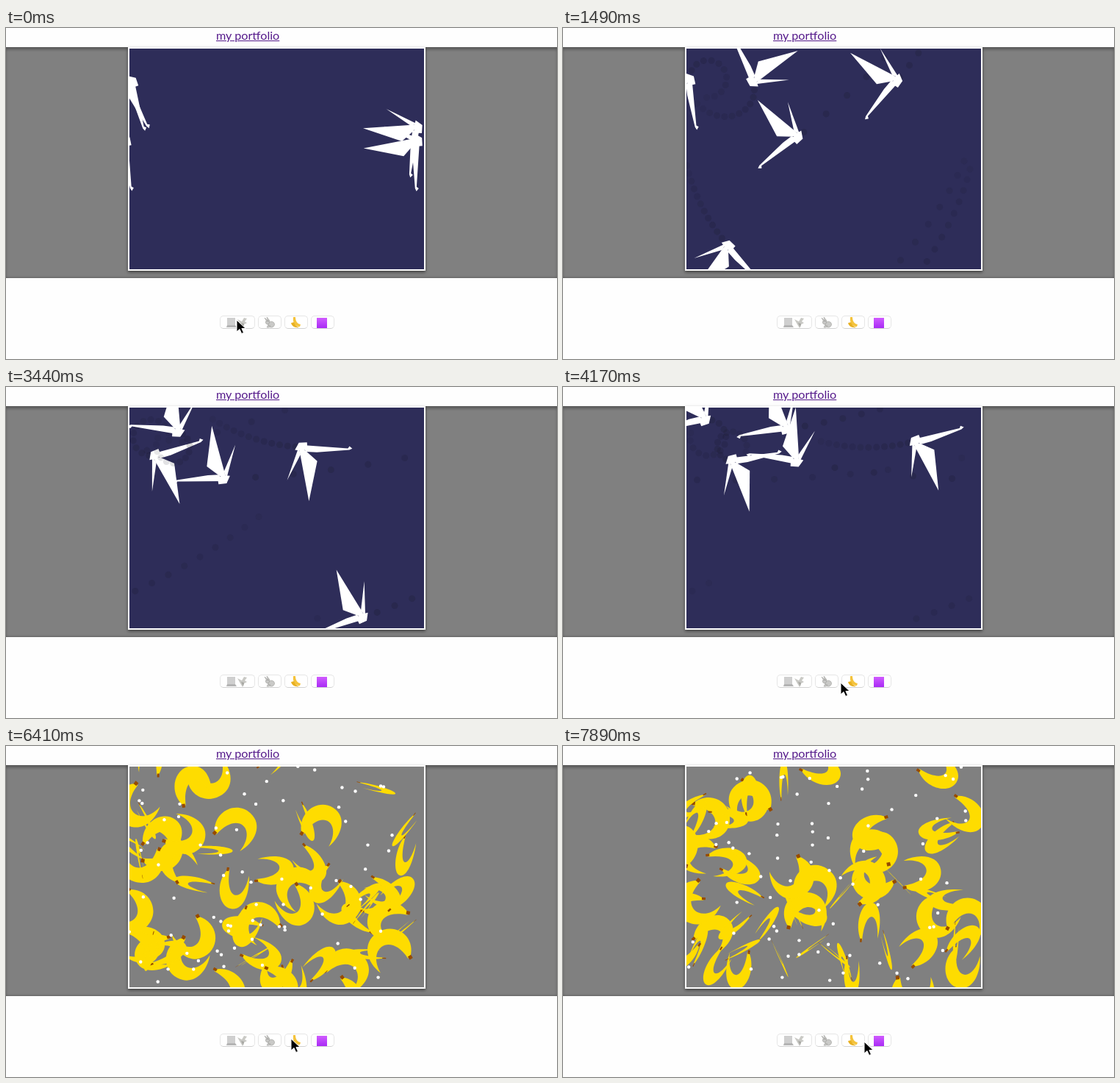
Recreate the animation shown at these times as an HTML page with a canvas. Size 750x450 px, loop 8000 ms.

```html
<!DOCTYPE html>
<html lang="en">
<head>
<meta charset="utf-8">
<title>my portfolio</title>
<style>
  html, body { margin: 0; width: 100%; height: 100%; overflow: hidden; background: #fefefe; }
  body > * { position: absolute; }
  a { left: 286px; top: 0; font: 16.2px/19px Lato, sans-serif; color: #551a8b; text-decoration: underline; }
  .band { left: 0; top: 26px; width: 750px; height: 314px; background: #808080;
          box-shadow: inset 0 4px 4px -1px rgba(0,0,0,.35), inset 0 -2px 3px -1px rgba(0,0,0,.25); }
  canvas { left: 166px; top: 26px; border: 2px solid #fff; box-shadow: 0 2px 4px rgba(0,0,0,.5); }
  .button { top: 391px; width: 30px; height: 16px; border: 1px solid #e6e6e6; border-bottom-color: #d2d2d2;
            border-radius: 5px; background: #fff; }
  svg { left: 0; top: 0; }
</style>
</head>
<body>
<a>my portfolio</a>
<div class="band"></div>
<canvas id="stage" width="401" height="300"></canvas>
<div class="button" style="left:291px;width:46px"></div>
<div class="button" style="left:343px"></div>
<div class="button" style="left:379px"></div>
<div class="button" style="left:415px"></div>
<svg width="750" height="450">
  <defs><linearGradient id="purple" x2="0" y2="1"><stop stop-color="#d05cff"/><stop offset="1" stop-color="#a92bf5"/></linearGradient></defs>
  <path d="M301 394h11v10h-11z" fill="#cfcfcf"/>
  <path d="M301 404h11l2 3h-14z" fill="#b4b4b4"/>
  <path d="M315 396l6 3 3-5 4 1-3 4 3 2-4 2-2 5-3-5z" fill="#c9c9c5"/>
  <path d="M320 401l3 6 1-5z" fill="#a5a5a0"/>
  <g fill="#c9c9c7" stroke="#9a9a98" stroke-width=".6">
    <ellipse cx="361" cy="403" rx="4.5" ry="4"/>
    <circle cx="356" cy="400" r="2.6"/>
    <path d="M352 394l5 4-2 1zM355 393l4 5-2 1zM357 404l-2 3h3l2-2z"/>
  </g>
  <path d="M391 393c-1 7 2 13 9 13l1-3c-5-1-7-5-7-10z" fill="#f4c33c"/>
  <path d="M388 401c1 4 5 7 11 6-4-1-6-4-7-7z" fill="#e8b020"/>
  <rect x="423" y="394" width="14" height="14" fill="url(#purple)"/>
  <path id="cursor" d="M0 0v16l4-3.5 2.7 6 2.8-1.2-2.6-5.8h5.3z" stroke="#fff"/>
</svg>
<script>
const LOOP = 8000, STEP = 148.7, SWITCH = 40;
const LEFT = 168, TOP = 28, WIDTH = 400, HEIGHT = 300;
const SAMPLES = 10, DROP = 7;  // path samples per step, samples between trail dots
const ctx = document.getElementById('stage').getContext('2d');
const cursor = document.getElementById('cursor');

const mod = (v, size) => ((v % size) + size) % size;
const mix = (a, b, u) => a + (b - a) * u;
const ramp = (v, from, to) => Math.min(1, Math.max(0, (v - from) / (to - from)));
const rand = (i, k) => mod(Math.sin(i * 127.1 + k * 311.7) * 43758.5453, 1);
const wrap = (v, start, size, margin = 7) => start - margin + mod(v - start + margin, size);

// Each bird steers through a total turn (degrees, eased by bend) and settles at its top speed.
const birds = [
  { x: 560, y: 136, heading: 98, turn: 111, bend: 0.7, top: 80.8 },
  { x: 560, y: 154, heading: 91, turn: 98, bend: 0.7, top: 39 },
  { x: 163, y: 154, heading: 84, turn: -131, bend: 1, top: 15.5 },
  { x: 172, y: 74, heading: 78, turn: -1308, bend: 1, top: 15 },
  { x: 165, y: 75, heading: 65, turn: -1186, bend: 1.45, top: 13 }
].map(fly);

function fly({ x, y, heading, turn, bend, top }) {
  const path = [];
  for (let i = 0; i <= SWITCH * SAMPLES; i++) {
    const step = (i + 0.5) / SAMPLES;
    const angle = (heading + turn * (step / 37) ** bend) * Math.PI / 180;
    const speed = mix(top, 16, Math.exp(-step / 9.8));
    path.push({ x: wrap(x, LEFT, WIDTH), y: wrap(y, TOP, HEIGHT), angle });
    x += Math.cos(angle) * speed / SAMPLES;
    y += Math.sin(angle) * speed / SAMPLES;
  }
  return path;
}

const birdParts = [
  'M0-3L62-1 64-4 68-1 64 1 20 6 5 6z',   // neck and beak
  'M12 73L21 18 5 5-4 0-3 8z',            // near wing
  'M-19 46L-2 10-5 0z',                   // far wing
  'M6-7L-5-6-10 4 0 5 7 2z'               // tail
].map(d => new Path2D(d));
const bananaShape = new Path2D('M0 0C20-22 52-8 52 20C52 46 26 54 4 46C42 44 44 4 0 4z');

function dot(x, y, r) {
  ctx.beginPath();
  ctx.arc(x, y, r, 0, 7);
  ctx.fill();
}

function placed(x, y, angle, draw) {
  ctx.save();
  ctx.translate(x, y);
  ctx.rotate(angle);
  draw();
  ctx.restore();
}

function drawBirds(step) {
  const now = step * SAMPLES;
  const lastDrop = Math.ceil(now / DROP) - 1;
  for (const path of birds) {
    for (let age = 0; age < 12 && age < lastDrop; age++) {
      const { x, y } = path[(lastDrop - age) * DROP];
      ctx.fillStyle = `rgba(20,20,30,${0.2 - age * 0.011})`;
      dot(x, y, 4.5);
    }
    const { x, y, angle } = path[now];
    ctx.fillStyle = '#fff';
    placed(x, y, angle, () => birdParts.forEach(part => ctx.fill(part)));
  }
}

// Seeded straight drift, denser towards the bottom.
const drift = (i, step, speed) => [
  wrap(LEFT + WIDTH * rand(i, 1) + (rand(i, 2) - 0.5) * speed * step, LEFT, WIDTH),
  wrap(TOP + HEIGHT * rand(i, 3) ** 0.85 + (rand(i, 4) - 0.5) * speed * step, TOP, HEIGHT)
];

function drawBanana(i, step) {
  const [x, y] = drift(i, step, 10);
  const spin = rand(i, 5) * 7 + (rand(i, 6) - 0.5) * 0.4 * step;
  placed(x, y, spin, () => {
    ctx.scale(1, Math.cos(rand(i, 7) * 7 + step * 0.25));
    ctx.fillStyle = '#fedc00';
    ctx.fill(bananaShape);
    ctx.fillStyle = '#964b00';
    ctx.fillRect(-3, -2, 5, 5);
  });
}

function drawBananas(step) {
  for (let i = 1; i <= 58; i++) drawBanana(i, step - SWITCH);
  ctx.fillStyle = '#fff';
  for (let i = 101; i <= 175; i++) dot(...drift(i, step - SWITCH, 14), 2.2);
}

function moveCursor(step) {
  let x = 314, y = 397;
  if (step >= 25) {
    const rise = ramp(step, 25, 28), settle = ramp(step, 28, 30), leave = ramp(step, 50, 53);
    x = mix(372, 378, rise) + 10 * settle + 22 * leave;
    y = mix(446, 402, rise) - 4 * settle + 4 * leave;
  }
  cursor.setAttribute('transform', `translate(${x} ${y})`);
  cursor.style.display = step >= 5 && step < 25 ? 'none' : '';
}

function render(now) {
  const step = Math.floor((now % LOOP) / STEP);
  const flying = step < SWITCH;
  ctx.setTransform(1, 0, 0, 1, 0, 0);
  ctx.fillStyle = flying ? '#2e2d59' : '#808080';
  ctx.fillRect(0, 0, 401, 300);
  ctx.translate(-LEFT, -TOP);
  (flying ? drawBirds : drawBananas)(step);
  moveCursor(step);
}

const start = performance.now();
function tick() {
  render(performance.now() - start);
  requestAnimationFrame(tick);
}
tick();
</script>
</body>
</html>
```
